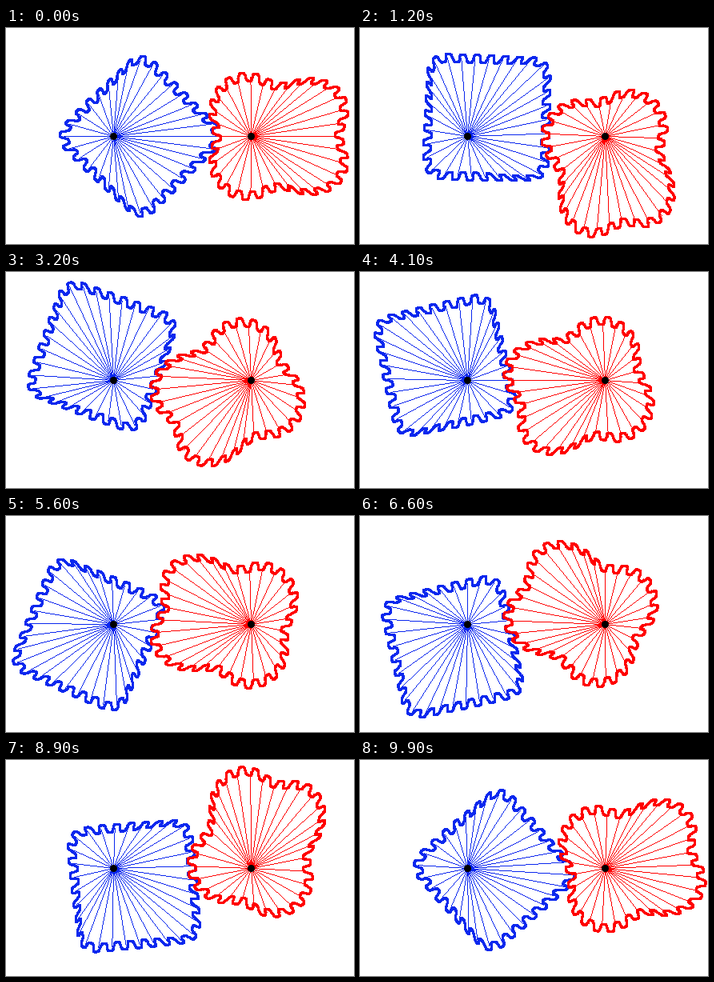
Write an HTML page with a canvas that moves like this. It is 435 px wide and 270 px high and loops after 10000 ms.

```html
<!DOCTYPE html>
<html lang="en">
<head>
<meta charset="utf-8">
<title>Non-circular gears</title>
<style>
  html, body { margin: 0; width: 100%; height: 100%; overflow: hidden; background: #fff; }
  canvas { display: block; }
</style>
</head>
<body>
<canvas id="stage" width="435" height="270"></canvas>
<script>
const ctx = document.getElementById('stage').getContext('2d');
const TAU = 2 * Math.PI;
const LOOP = 10000, STEP = 100;
const TEETH = 32, PER_TOOTH = 64, COUNT = TEETH * PER_TOOTH;
const AXLE = 172;        // distance between the two shafts
const CORNER = 95.5;     // centre of the rounded square to its corners
const OFFSET = 33.5;     // centre of the rounded square to its shaft
const DEPTH = 5;         // tooth height above the pitch curve
const SHARP = 2.5;       // steepness of the tooth flanks
const PEN = 3;
const BLUE = { x: 134, y: 135, color: '#0b28ee' };
const RED = { x: BLUE.x + AXLE, y: 135, color: '#ff0000' };

// Point on a rounded square standing on its corner, u in 0..1 from the right corner.
function squarePoint(u, side) {
  const round = (Math.SQRT2 * side - CORNER) / (Math.SQRT2 - 1);
  const flat = 2 * (side - round), arc = round * Math.PI / 4;
  const quarter = Math.floor(u * 4);
  const d = (u * 4 - quarter) * (flat + 2 * arc);
  const reach = CORNER - round;
  const along = Math.min(1, Math.max(0, (d - arc) / flat));
  const turn = d < arc ? d / round
    : d < arc + flat ? Math.PI / 4
    : Math.PI / 4 + (d - arc - flat) / round;
  const x = reach * (1 - along) + round * Math.cos(turn);
  const y = reach * along + round * Math.sin(turn);
  const c = Math.cos(quarter * Math.PI / 2), s = Math.sin(quarter * Math.PI / 2);
  return [x * c - y * s + OFFSET, x * s + y * c];
}

// Pitch curve in polar form, with the angle the mating gear has turned.
function pitchCurve(side) {
  const curve = [];
  let mate = 0, last = null;
  for (let i = 0; i <= COUNT; i++) {
    const [x, y] = squarePoint(i / COUNT, side);
    const r = Math.hypot(x, y);
    let angle = Math.atan2(y, x);
    if (last) {
      while (angle < last.angle - 1) angle += TAU;
      const mid = (r + last.r) / 2;
      mate += (angle - last.angle) * mid / (AXLE - mid);
    }
    last = { angle, r, mate };
    curve.push(last);
  }
  return curve;
}

// Choose the side so that one turn of blue is exactly one turn of red.
let low = 68, high = 82;
for (let i = 0; i < 30; i++) {
  const side = (low + high) / 2;
  if (pitchCurve(side)[COUNT].mate < TAU) low = side; else high = side;
}
const curve = pitchCurve(low);

const tooth = i =>
  DEPTH * Math.tanh(SHARP * Math.cos(TAU * (i / PER_TOOTH + 1 / 8))) / Math.tanh(SHARP);

const blueShape = curve.map((p, i) => ({ angle: p.angle, pitch: p.r, edge: p.r + tooth(i) }));
const redShape = curve.map((p, i) => ({
  angle: Math.PI - p.mate, pitch: AXLE - p.r, edge: AXLE - p.r - tooth(i)
}));

function mateAngle(angle) {
  const i = Math.max(1, curve.findIndex(p => p.angle >= angle));
  const a = curve[i - 1], b = curve[i];
  return a.mate + (b.mate - a.mate) * (angle - a.angle) / (b.angle - a.angle);
}

// Square pen on whole pixels, for hard edges.
function stamp(x, y, size) {
  const half = (size - 1) / 2;
  ctx.fillRect(Math.round(x) - half, Math.round(y) - half, size, size);
}

function thinLine(x, y, dx, dy) {
  const n = Math.round(Math.max(Math.abs(dx), Math.abs(dy)));
  for (let k = 0; k <= n; k++) stamp(x + dx * k / n, y + dy * k / n, 1);
}

function drawGear(gear, shape, turn) {
  const arm = (p, r) => [r * Math.cos(p.angle + turn), -r * Math.sin(p.angle + turn)];
  ctx.fillStyle = gear.color;
  for (let i = 0; i < COUNT; i += PER_TOOTH) {
    thinLine(gear.x, gear.y, ...arm(shape[i], shape[i].pitch));
  }
  for (const p of shape) {
    const [dx, dy] = arm(p, p.edge);
    stamp(gear.x + dx, gear.y + dy, PEN);
  }
  ctx.fillStyle = '#000';
  ctx.beginPath();
  ctx.arc(gear.x + 0.5, gear.y + 0.5, 4.5, 0, TAU);
  ctx.fill();
}

let shown = -1;
function draw() {
  const step = Math.floor(performance.now() % LOOP / STEP);
  if (step !== shown) {
    shown = step;
    const turn = TAU * step * STEP / LOOP;
    ctx.fillStyle = '#fff';
    ctx.fillRect(0, 0, 435, 270);
    drawGear(BLUE, blueShape, turn);
    drawGear(RED, redShape, -mateAngle(turn));
  }
  requestAnimationFrame(draw);
}
draw();
</script>
</body>
</html>
```
